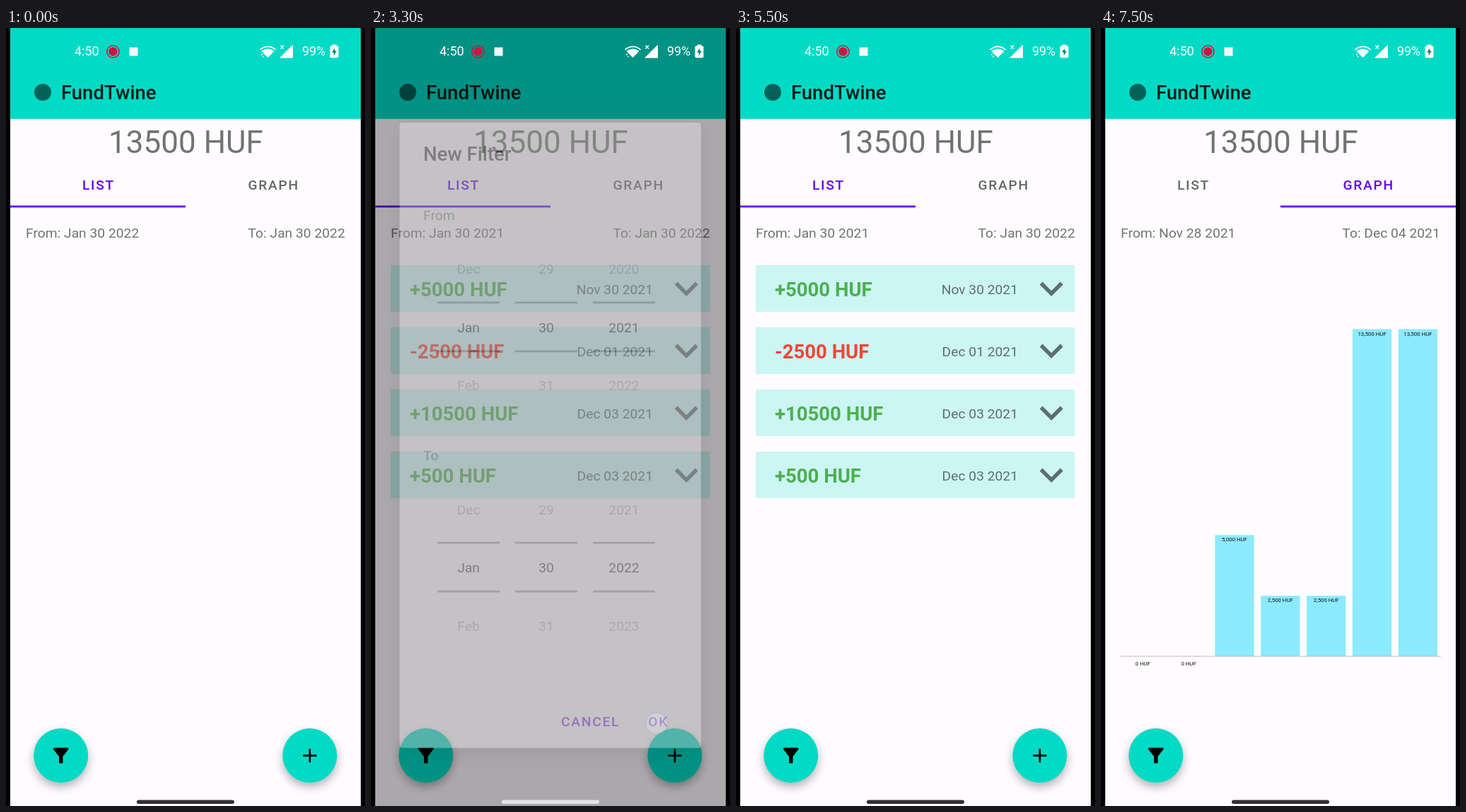
These frames come from a looping animation (508x1102 px, 8 s). An HTML page with a canvas:

```html
<!DOCTYPE html>
<html lang="en">
<head>
<meta charset="utf-8">
<title>Expense tracker demo</title>
<style>
html, body { margin: 0; width: 100%; height: 100%; overflow: hidden; background: #000; }
canvas { display: block; width: 508px; height: 1102px; }
</style>
</head>
<body>
<canvas id="stage" width="508" height="1102"></canvas>
<script>
const W = 508, H = 1102, LOOP = 8000, STEP = 100;
const TEAL = '#03dac5', PURPLE = '#6200ee', PAPER = '#fffcff';
const GREY = 'rgba(0,0,0,.55)', INK = 'rgba(0,0,0,.87)';
const BODY = 19.25, HEAD = 27.5, SPACING = 1.72, ROW = 82.5;

const stage = document.getElementById('stage').getContext('2d');
const layer = document.createElement('canvas');
layer.width = W;
layer.height = H;
const dialog = layer.getContext('2d');

const ICONS = {
  filter: 'M4.25 5.61C6.27 8.2 10 13 10 13v6c0 .55.45 1 1 1h2c.55 0 1-.45 1-1v-6s3.72-4.8 5.74-7.39C20.25 4.95 19.78 4 18.95 4H5.04c-.83 0-1.3.95-.79 1.61z',
  plus: 'M19 13h-6v6h-2v-6H5v-2h6V5h2v6h6z',
  down: 'M16.59 8.59L12 13.17 7.41 8.59 6 10l6 6 6-6z',
  up: 'M12 8l-6 6 1.41 1.41L12 10.83l4.59 4.58L18 14z',
  trash: 'M6 19c0 1.1.9 2 2 2h8c1.1 0 2-.9 2-2V7H6zM19 4h-3.5l-1-1h-5l-1 1H5v2h14z',
  bolt: 'M13 4l-6 9h4v7l6-10h-4z'
};
for (const k in ICONS) ICONS[k] = new Path2D(ICONS[k]);

const ITEMS = [
  ['+5000 HUF', 'Nov 30 2021'],
  ['-2500 HUF', 'Dec 01 2021'],
  ['+10500 HUF', 'Dec 03 2021'],
  ['+500 HUF', 'Dec 03 2021']
];
const BALANCES = [0, 0, 5000, 2500, 2500, 13500, 13500];

// start, release, end of fade, x, y, distance dragged down
const TOUCHES = [
  [700, 850, 990, 78, 1030, 0],
  [1700, 2100, 2200, 358, 396, 40],
  [3100, 3220, 3350, 404, 985, 0],
  [4400, 4470, 4640, 434, 362, 0],
  [5200, 5270, 5440, 436, 361, 0],
  [5700, 5770, 5940, 444, 458, 0],
  [6600, 6670, 6840, 444, 458, 0],
  [7100, 7170, 7300, 378, 222, 0]
];

const ramp = (t, a, b) => Math.min(1, Math.max(0, (t - a) / (b - a)));
const easeOut = (x, power) => 1 - (1 - x) ** power;
const within = (t, a, b) => t >= a && t < b;

function text(c, str, x, y, size, color, opt = {}) {
  c.font = `${opt.weight || 400} ${size}px Roboto, sans-serif`;
  c.letterSpacing = (opt.spacing || 0) + 'px';
  c.textAlign = opt.align || 'left';
  c.fillStyle = color;
  c.fillText(str, x, y);
}

function icon(c, name, cx, cy, scale, color) {
  c.save();
  c.translate(cx - 12 * scale, cy - 12 * scale);
  c.scale(scale, scale);
  c.fillStyle = color;
  c.fill(ICONS[name]);
  c.restore();
}

function disc(c, x, y, r, color) {
  c.fillStyle = color;
  c.beginPath();
  c.arc(x, y, r, 0, Math.PI * 2);
  c.fill();
}

function box(c, x, y, w, h, color, r = 0) {
  c.fillStyle = color;
  c.beginPath();
  c.roundRect(x, y, w, h, r);
  c.fill();
}

function shadow(c, alpha, blur, dy) {
  c.shadowColor = `rgba(0,0,0,${alpha})`;
  c.shadowBlur = blur;
  c.shadowOffsetY = dy;
}

function fab(c, x, name, pressed) {
  c.save();
  shadow(c, 0.3, 13, 6);
  disc(c, x, 1030.5, 38.5, TEAL);
  c.restore();
  if (pressed) disc(c, x, 1030.5, 38.5, `rgba(0,0,0,${0.24 * pressed})`);
  icon(c, name, x, 1030.5, 1.375, '#000');
}

function dates(c, from, to) {
  text(c, 'From: ' + from, 28, 297, BODY, GREY);
  text(c, 'To: ' + to, 479.7, 297, BODY, GREY, { align: 'right' });
}

function card(c, item, y, open) {
  const [amount, date] = item;
  box(c, 28, y, 451.5, open ? 132 : 66, 'rgba(3,218,197,.2)');
  const color = amount[0] === '-' ? '#f44336' : '#4caf50';
  text(c, amount, 55, y + 43.5, HEAD, color, { weight: 700 });
  text(c, date, 399, y + 41, BODY, GREY, { align: 'right' });
  icon(c, open ? 'up' : 'down', 446.3, y + 33, 2.75, GREY);
  if (open) {
    text(c, 'asd', 42, y + 100, BODY, GREY);
    icon(c, 'trash', 446.3, y + 99, 2.75, GREY);
  }
}

function listPage(c, t) {
  const filtered = t >= 3200;
  dates(c, filtered ? 'Jan 30 2021' : 'Jan 30 2022', 'Jan 30 2022');
  if (filtered) {
    const open = within(t, 4450, 5300) ? 0 : within(t, 5800, 6700) ? 1 : -1;
    let y = 336;
    ITEMS.forEach((item, i) => {
      card(c, item, y, i === open);
      y += i === open ? 154 : 88;
    });
  }
  const pressed = ramp(t, 690, 850) * (1 - ramp(t, 1000, 1200));
  fab(c, 77.7, 'filter', pressed);
  fab(c, 429.9, 'plus', 0);
}

function graphPage(c) {
  dates(c, 'Nov 28 2021', 'Dec 04 2021');
  BALANCES.forEach((value, i) => {
    const x = 31.6 + i * 64.87, h = value * 463.5 / 13500;
    box(c, x, 890 - h, 55.2, h, '#8ceaff');
    const label = value.toLocaleString('en-US') + ' HUF';
    text(c, label, x + 27.6, value ? 899 - h : 902.7, 7.8, '#111', { align: 'center' });
  });
  box(c, 27, 889.6, 454, 1, '#bdbdbd');
  fab(c, 77.7, 'filter', 0);
}

function app(c, t) {
  box(c, 6, 0, 496, H, PAPER);
  box(c, 6, 0, 496, 128.7, TEAL);
  disc(c, 52, 91, 12, 'rgba(0,0,0,.55)');
  text(c, 'FundTwine', 78, 101, HEAD, INK, { weight: 500 });
  text(c, '13500 HUF', 254.5, 176.5, 44, GREY, { align: 'center' });

  const p = easeOut(ramp(t, 7180, 7480), 3);
  const tab = { align: 'center', weight: 500, spacing: SPACING };
  const idle = 'rgba(0,0,0,.6)', graph = t >= 7200;
  text(c, 'LIST', 131, 229, BODY, graph ? idle : PURPLE, tab);
  text(c, 'GRAPH', 378.7, 229, BODY, graph ? PURPLE : idle, tab);
  box(c, 6 + 248 * p, 251.6, 248, 2.75, PURPLE);

  c.save();
  c.beginPath();
  c.rect(6, 255, 496, H - 255);
  c.clip();
  c.translate(-496 * p, 0);
  if (p < 1) listPage(c, t);
  c.translate(496, 0);
  if (p > 0) graphPage(c);
  c.restore();
}

function column(c, x, cy, pos, label) {
  c.save();
  c.beginPath();
  c.rect(x - 44, cy - 123.75, 88, 247.5);
  c.clip();
  const mid = Math.round(pos);
  for (let v = mid - 2; v <= mid + 2; v++) {
    text(c, label(v), x, cy + 6.9 + (v - pos) * ROW, BODY, INK, { align: 'center' });
  }
  for (const dy of [-36.5, 32.5]) box(c, x - 44, cy + dy, 88, 2.75, GREY);
  for (const side of [-1, 1]) {
    const g = c.createLinearGradient(0, cy + side * 123.75, 0, cy + side * 9.6);
    g.addColorStop(0, 'rgba(255,252,255,1)');
    g.addColorStop(1, 'rgba(255,252,255,0)');
    box(c, x - 44, side < 0 ? cy - 124 : cy + 9.6, 88, 114.4, g);
  }
  c.restore();
}

function picker(c, title, cy, year) {
  const months = ['Nov', 'Dec', 'Jan', 'Feb', 'Mar'];
  text(c, title, 74, cy - 152, BODY, GREY);
  column(c, 138, cy, 2, v => months[v]);
  column(c, 248, cy, 30, v => String(v > 31 ? v - 31 : v));
  column(c, 358, cy, year, String);
}

function drawDialog(c, t) {
  c.clearRect(0, 0, W, H);
  c.save();
  shadow(c, 0.22, 26, 10);
  box(c, 40.5, 134, 426.5, 885.7, PAPER, 4);
  c.restore();
  text(c, 'New Filter', 74, 188, HEAD, INK, { weight: 500 });

  const drag = 40 * ramp(t, 1700, 2100);
  const settle = (ROW - 40) * easeOut(ramp(t, 2100, 2900), 5);
  picker(c, 'From', 424, 2022 - (drag + settle) / ROW);
  picker(c, 'To', 764.3, 2022);

  const button = { weight: 500, spacing: SPACING };
  text(c, 'CANCEL', 269, 989, BODY, PURPLE, button);
  text(c, 'OK', 392.3, 989, BODY, PURPLE, button);
}

function statusBar(c) {
  text(c, '4:50', 97, 39.4, 17.9, '#fff');
  disc(c, 151.4, 33.4, 6.2, '#cc1540');
  c.strokeStyle = '#cc1540';
  c.lineWidth = 1.5;
  c.beginPath();
  c.arc(151.4, 33.4, 8.7, 0, Math.PI * 2);
  c.stroke();
  box(c, 174.5, 27.5, 12, 12, '#f2f8f7');

  // wifi
  const a = -Math.PI * 0.75, b = -Math.PI * 0.25;
  c.fillStyle = c.strokeStyle = '#fff';
  c.beginPath();
  c.moveTo(370.5, 42);
  c.arc(370.5, 42, 12.6, a, b);
  c.fill();
  c.lineWidth = 1.8;
  c.beginPath();
  c.arc(370.5, 42, 15.6, a, b);
  c.stroke();
  disc(c, 362, 37.6, 1.1, '#fff');
  disc(c, 364, 40.6, 0.9, '#fff');

  // mobile signal
  c.beginPath();
  c.moveTo(387, 42.5);
  c.lineTo(406, 42.5);
  c.lineTo(406, 23.5);
  c.fill();
  c.lineWidth = 1.3;
  c.beginPath();
  c.moveTo(388.5, 24.5);
  c.lineTo(393, 29.5);
  c.moveTo(393, 24.5);
  c.lineTo(388.5, 29.5);
  c.stroke();

  text(c, '99%', 419, 39.4, 17.9, '#fff');
  box(c, 461.5, 23.5, 6, 4, '#fff', 1);
  box(c, 458.5, 25.3, 12, 17, '#fff', 2);
  icon(c, 'bolt', 464.5, 33.9, 0.68, '#087f75');
}

function touch(c, t) {
  for (const [start, up, end, x, y, drag] of TOUCHES) {
    if (!within(t, start, end)) continue;
    const cy = y + drag * ramp(t, start, up);
    const g = c.createRadialGradient(x, cy, 0, x, cy, 17);
    g.addColorStop(0, 'rgba(255,255,255,.5)');
    g.addColorStop(0.82, 'rgba(245,248,250,.5)');
    g.addColorStop(0.92, 'rgba(140,165,180,.5)');
    g.addColorStop(1, 'rgba(150,170,185,.15)');
    c.globalAlpha = 1 - 0.85 * ramp(t, up, end);
    disc(c, x, cy, 17, g);
    c.globalAlpha = 1;
  }
}

function render(t) {
  const c = stage;
  c.fillStyle = '#000';
  c.fillRect(0, 0, W, H);
  c.save();
  c.beginPath();
  c.rect(6, 0, 496, H);
  c.clip();
  app(c, t);

  const dim = ramp(t, 905, 1115) * (1 - ramp(t, 3195, 3430));
  if (dim) box(c, 6, 0, 496, H, `rgba(0,0,0,${0.6 * dim})`);
  const alpha = easeOut(ramp(t, 905, 1130), 3) * (1 - ramp(t, 3231, 3331));
  if (alpha) {
    drawDialog(dialog, t);
    c.globalAlpha = alpha;
    c.drawImage(layer, 0, 0);
    c.globalAlpha = 1;
  }

  statusBar(c);
  box(c, 185, 1093.6, 138, 5.4, within(t, 1200, 3600) ? '#e6e4e6' : '#332f35', 2.7);
  touch(c, t);
  c.restore();
}

const origin = performance.now();
function tick() {
  const t = (performance.now() - origin) % LOOP;
  render(Math.floor(t / STEP) * STEP);
  requestAnimationFrame(tick);
}
tick();
</script>
</body>
</html>
```
